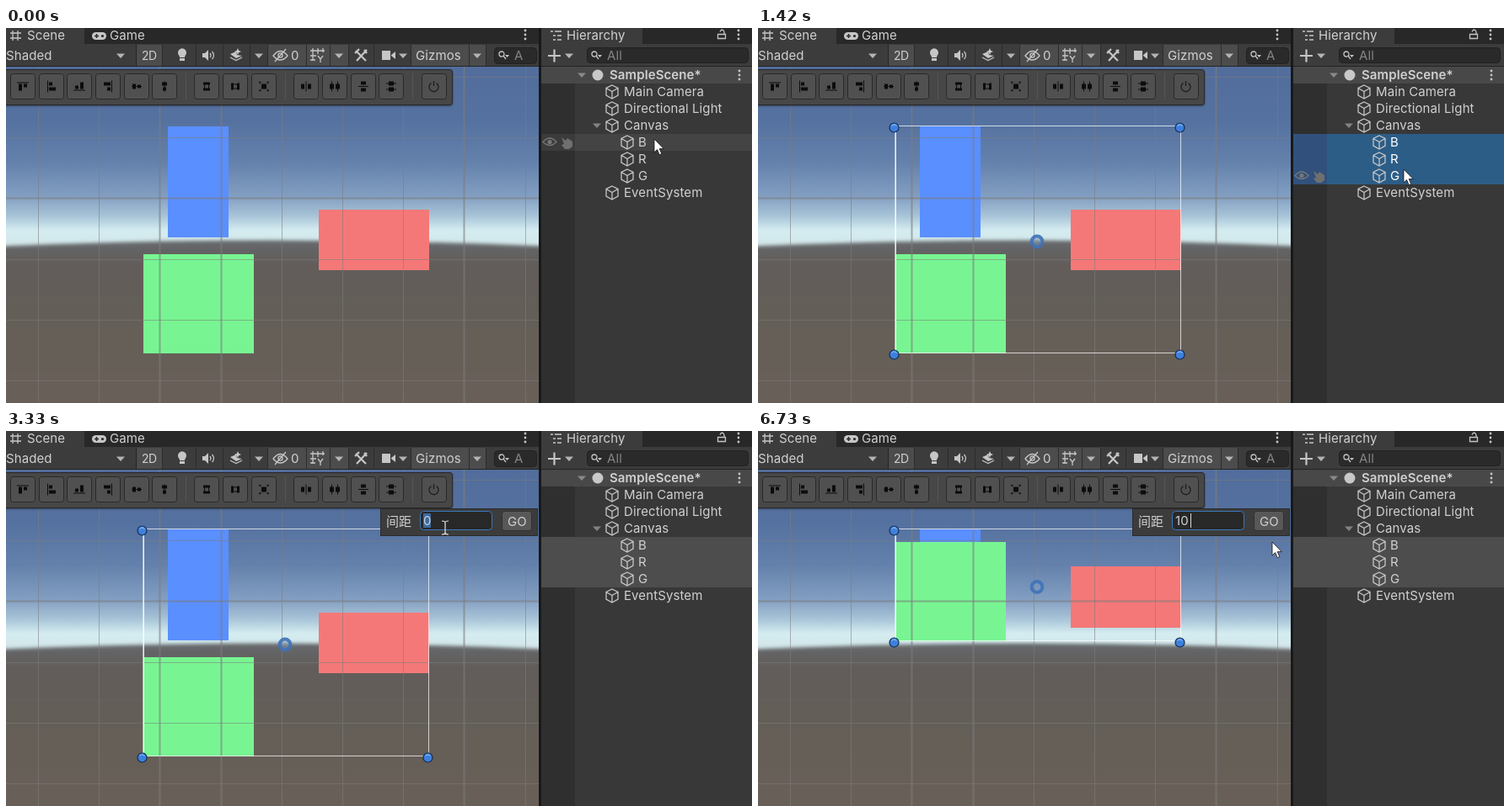
These frames come from a looping animation (885 by 446 pixels, 6790 ms). An HTML page:

```html
<!DOCTYPE html>
<html lang="en">
<head>
<meta charset="utf-8">
<title>Layout tools</title>
<style>
html, body { margin: 0; width: 100%; height: 100%; overflow: hidden; background: #383838; }
svg { display: block; width: 100%; height: 100%; }
text { font: 15px Inter, sans-serif; letter-spacing: .1px; fill: #d0d0d0; white-space: pre; }
.zh { font-family: "Noto Sans CJK SC", "Noto Sans CJK", sans-serif; letter-spacing: 0; }
.dim { fill: #858585; }
.bold { font-weight: 600; }
.mode { font-size: 14px; letter-spacing: -.6px; }
.line { fill: none; stroke: #c6c6c6; stroke-width: 1.3; }
.thick { stroke-width: 2.2; }
.solid { fill: #c6c6c6; }
</style>
</head>
<body>
<svg id="stage" viewBox="0 0 885 446">
  <defs>
    <linearGradient id="sky" gradientUnits="userSpaceOnUse" x1="0" y1="46" x2="0" y2="260">
      <stop offset="0" stop-color="#526d9c"/>
      <stop offset=".3" stop-color="#55719f"/>
      <stop offset=".53" stop-color="#6481ac"/>
      <stop offset=".72" stop-color="#829ec1"/>
      <stop offset=".83" stop-color="#a8c4d8"/>
      <stop offset=".91" stop-color="#d4ecf0"/>
      <stop offset="1" stop-color="#d2e6e9"/>
    </linearGradient>
    <linearGradient id="ground" gradientUnits="userSpaceOnUse" x1="0" y1="253" x2="0" y2="446">
      <stop offset="0" stop-color="#66696c"/>
      <stop offset=".14" stop-color="#625d5a"/>
      <stop offset="1" stop-color="#686059"/>
    </linearGradient>
    <filter id="soft" x="-5%" y="-10%" width="110%" height="120%"><feGaussianBlur stdDeviation="2"/></filter>
    <filter id="shadow" x="-10%" y="-30%" width="120%" height="170%"><feDropShadow dx="0" dy="1" stdDeviation="1.2" flood-opacity=".4"/></filter>
    <clipPath id="sceneClip"><rect y="46" width="632" height="400"/></clipPath>
    <clipPath id="findClip"><rect x="580" y="23" width="33" height="20"/></clipPath>
    <path id="down" d="M-5-2.5h10L0 3z" fill="#b4b4b4"/>
    <path id="cube" class="line" d="M0-8l7 3.5v8.5l-7 4-7-4v-8.5zM-7-4.5l7 4 7-4M0-.5v8.5"/>
    <g id="find"><circle class="line" cx="-2" cy="-2" r="3"/><path class="line" d="M0 0l3 4"/><path class="solid" d="M2-1h5L4.500 2z"/></g>
    <g id="dots" class="solid"><circle cy="-5" r="1.4"/><circle r="1.4"/><circle cy="5" r="1.4"/></g>
  </defs>

  <g clip-path="url(#sceneClip)">
    <rect y="46" width="632" height="224" fill="url(#sky)"/>
    <path d="M-20 260Q316 245 652 260V470H-20z" fill="url(#ground)" filter="url(#soft)"/>
    <rect id="B" x="192" y="117" width="72" height="132" fill="#5a8fff"/>
    <rect id="R" x="371" y="216" width="131" height="72" fill="#f57878"/>
    <rect id="G" x="163" y="269" width="131" height="118" fill="#78f592"/>
    <g id="grid" stroke="#7d7d7d"></g>
    <g id="selection"></g>
  </g>

  <g id="bar"></g>
  <g id="popup">
    <rect x="444.5" y="92.5" width="186" height="32" fill="#3c3c3c" stroke="#2b2b2b"/>
    <text class="zh" lang="zh" x="451" y="112.5">间距</text>
    <rect id="field" x="491.5" y="95.5" width="85" height="22" rx="4" fill="#282828"/>
    <rect id="mark" x="495" y="98" width="9" height="17" fill="#3d6a9e"/>
    <text id="value" x="495" y="112"></text>
    <rect id="caret" y="98" width="1" height="17" fill="#d8d8d8"/>
    <rect id="go" x="588.5" y="95.5" width="35" height="23" rx="3" stroke="#303030"/>
    <text x="595" y="112.5">GO</text>
  </g>

  <g id="sceneTabs">
    <rect width="632" height="19" fill="#282828"/>
    <rect width="93" height="19" fill="#3c3c3c"/>
    <path class="line" d="M8 3v12M14 3v12M5 6h13M5 12h13"/>
    <text x="25" y="14">Scene</text>
    <rect class="solid" x="102" y="5" width="17" height="9" rx="4.5"/>
    <path d="M105 9.5h5M107.5 7v5" stroke="#282828" stroke-width="1.5"/>
    <circle cx="114.5" cy="9.5" r="1.6" fill="#282828"/>
    <text x="123" y="14">Game</text>
    <use href="#dots" x="616" y="8"/>
    <rect y="19" width="632" height="27" fill="#3c3c3c"/>
    <path d="M155 20h30v25h-30zM310 20h96v25h-96zM481 20h88v25h-88z" fill="#4c4c4c"/>
    <path d="M0 45.5h632M154.500 20v25" stroke="#232323"/>
    <path d="M185.5 20v25M225.5 20v25M257.5 20v25M289.5 20v25M310.5 20v25M356.5 20v25M384.5 20v25M406.5 20v25M436.5 20v25M480.5 20v25M549.5 20v25M569.5 20v25" stroke="#2c2c2c"/>
    <text x="0" y="38">Shaded</text>
    <text class="mode" x="161" y="38">2D</text>
    <path class="solid" d="M206 35q0-2-1.5-3.5a5 5 0 1 1 9 0q-1.5 1.5-1.5 3.5zM206 36h6v3h-6z"/>
    <path class="solid" d="M233 30h3l4-4v13l-4-4h-3z"/>
    <path class="line" d="M242 30q2 2.5 0 5M244.5 28q4 4.5 0 9"/>
    <path class="solid" d="M266 31l7-3 1 4 6 1-7 3zM275 24l1.2 2.8 2.8 1.2-2.8 1.2-1.2 2.8-1.2-2.8-2.8-1.2 2.8-1.2z"/>
    <path class="line" d="M266 35l7 3.5 7-3.5"/>
    <path class="line" d="M317 33q8.500-11 17 0-8.500 10-17 0zM319 40l13-15"/>
    <circle class="line" cx="325.5" cy="32.5" r="2.6"/>
    <text x="338" y="38">0</text>
    <path class="line" d="M364 24v15M370 24v7M376 24v5M361 27h17M361 33h7M361 38h6M370 33l3 4 3-4M373 37v4"/>
    <path class="line thick" d="M415 27l12 12M428 26l-12 13M414 30l5-5M425 26l3 4"/>
    <path class="solid" d="M446 27h10v11h-10zM457 32l5-4v9l-5-4z"/>
    <text x="486" y="38">Gizmos</text>
    <rect x="579.5" y="23.5" width="50" height="19" rx="4" fill="#2a2a2a" stroke="#212121"/>
    <use href="#find" x="590" y="33"/>
    <g clip-path="url(#findClip)"><text class="dim" x="603" y="38">A</text></g>
  </g>

  <g id="hierarchy">
    <rect x="632" width="3" height="446" fill="#191919"/>
    <rect x="635" width="250" height="19" fill="#282828"/>
    <rect x="635" width="120" height="19" fill="#3c3c3c"/>
    <path class="line" d="M646 4h3M651 4h8M649 9h3M654 9h5M649 14h3M654 14h5"/>
    <text x="665" y="14">Hierarchy</text>
    <path class="line" d="M844.500 7.500h9v5h-9zM852 7.500v-3q-2.500-5-5 0"/>
    <use href="#dots" x="869" y="8"/>
    <rect x="635" y="19" width="250" height="27" fill="#3c3c3c"/>
    <path d="M635 45.5h250" stroke="#232323"/>
    <path class="line thick" d="M643 33h15M650.5 25.5v15"/>
    <rect x="689.5" y="23.5" width="191" height="18" rx="4" fill="#2a2a2a" stroke="#212121"/>
    <use href="#find" x="700" y="33"/>
    <text class="dim" x="713" y="37.5">All</text>
    <rect x="635" y="46" width="250" height="400" fill="#383838"/>
    <rect x="635" y="46" width="40" height="400" fill="#2f2f2f"/>
    <rect x="635" y="46" width="250" height="20" fill="#484848"/>
    <g id="rows"></g>
    <circle cx="702" cy="56" r="6.5" fill="#c8c8c8"/>
    <text class="bold" x="716" y="61">SampleScene*</text>
    <use href="#dots" x="870" y="56"/>
    <g id="eye">
      <path d="M637-.5q8-9 16 0-8 8-16 0z" fill="none" stroke="#777" stroke-width="1.3"/>
      <circle cx="645" cy="-.5" r="2.6" fill="#777"/>
      <path d="M659-6l5 4 2-3 6 4v6l-4 3h-5l-4-5 3-1z" fill="#707070"/>
    </g>
  </g>

  <path id="arrow" d="M0 0V16L3.6 12.6 6.2 18.7 8.8 17.5 6.2 11.6H11.2z" fill="#fff" stroke="#111" stroke-width=".8"/>
  <path id="beam" d="M-4-8q4 0 4 2 0-2 4-2M-4 8q4 0 4-2 0 2 4 2M0-6V6" fill="none" stroke="#e4e4e4" stroke-width="1.2"/>
</svg>

<script>
const LOOP = 6790;
const $ = id => document.getElementById(id);
const set = (el, attrs) => { for (const k in attrs) el.setAttribute(k, attrs[k]); };
const show = (el, on) => el.setAttribute('visibility', on ? 'visible' : 'hidden');
const append = (id, markup) => $(id).insertAdjacentHTML('beforeend', markup);

// scene grid, with a few stronger lines
const gridLine = (d, major) => `<path d="${d}" stroke-width="${major ? 2 : 1}" opacity="${major ? .6 : .55}"/>`;
const gridAt = (first, i) => Math.round(first + 72.2 * i) + .5;
for (let i = 0; i < 9; i++) append('grid', gridLine(`M${gridAt(38, i)} 46V446`, [2, 3, 7].includes(i)));
for (let i = 0; i < 6; i++) append('grid', gridLine(`M0 ${gridAt(58, i)}H632`, i === 2));

// dropdown and foldout arrows
const down = (x, y, opacity = 1) => `<use href="#down" x="${x}" y="${y}" opacity="${opacity}"/>`;
for (const x of [136, 300, 395, 471, 559]) append('sceneTabs', down(x, 33));
append('hierarchy', down(668, 33) + down(683, 56, .6) + down(701, 116, .6));

// floating align toolbar: [center x, icon path, rotation]
const EDGE = 'M-7-5h14v1h-14zM-5-3h4v8h-4zM1-3h4v4h-4z';
const MIDDLE = 'M-6-.5h12v1h-12zM-5-3h4v6h-4zM1-2h4v4h-4z';
const SIZE = 'M-4-5h8v3h-8zM-4 2h8v3h-8zM-3-2h1v4h-1zM2-2h1v4h-1z';
const BURST = 'M-3-3h6v6h-6zM-6-6l3 1-2 2zM6-6l-3 1 2 2zM-6 6l3-1-2-2zM6 6l-3-1 2-2z';
const GAP = 'M-.5-6h1v12h-1zM-6-3h4v6h-4zM2-3h4v6h-4z';
const SPREAD = 'M-4-6h1v12h-1zM3-6h1v12h-1zM-6-3h5v6h-5zM1-3h5v6h-5z';
const tools = [
  [20, EDGE, 0], [54, EDGE, -90], [87, EDGE, 180], [121, EDGE, 90], [155, MIDDLE, 0], [188, MIDDLE, 90],
  [238, SIZE, 0], [272, SIZE, 90], [306, BURST, 0],
  [356, GAP, 0], [390, SPREAD, 0], [424, GAP, 90], [457, SPREAD, 90], [508, '', 0]
];
append('bar', '<rect x="-5" y="49.5" width="534.5" height="42" rx="3" fill="#464646" stroke="#262626" filter="url(#shadow)"/>'
  + '<path d="M213.5 54v31M331.5 54v31M482.5 54v31" stroke="#555"/>'
  + tools.map(([x, icon, turn]) => `<g transform="translate(${x} 69.5)">
    <rect class="tool" x="-14.5" y="-15" width="29" height="30" rx="3" fill="#505050" stroke="#292929"/>
    <path d="${icon}" transform="rotate(${turn})" fill="#0c0c0c"/></g>`).join('')
  + '<path d="M504.5 65.5a5.500 5.500 0 1 0 6 0M507.5 63v6" fill="none" stroke="#1a1a1a" stroke-width="1.2"/>');
const spreadTool = document.querySelectorAll('.tool')[12];

// hierarchy rows
const names = ['Main Camera', 'Directional Light', 'Canvas', 'B', 'R', 'G', 'EventSystem'];
append('rows', names.map((name, i) => {
  const y = 76 + 20 * i, nested = name.length === 1, x = nested ? 737 : 719;
  return `<rect class="gutter" x="635" y="${y - 10}" width="40" height="20"/>
    <rect class="row" x="675" y="${y - 10}" width="210" height="20"/>
    <use href="#cube" x="${x}" y="${y}"/><text class="name" x="${x + (nested ? 13 : 14)}" y="${y + 5}">${name}</text>`;
}).join(''));
const [gutters, rows, labels] = ['.gutter', '.row', '.name'].map(c => [...document.querySelectorAll(c)]);

const smooth = p => p * p * (3 - 2 * p);
const out = p => 1 - (1 - p) * (1 - p);
// pointer path: time, x, y, easing of the move that ends here
const path = [
  [0, 769, 132], [200, 769, 132], [460, 768, 150, smooth], [660, 768, 150], [900, 767, 168, smooth],
  [1410, 767, 168], [1750, 491, 86, smooth], [1960, 459, 73, out], [2339, 459, 73], [2340, 460, 71],
  [2880, 460, 71], [3060, 521, 115, smooth], [4930, 521, 115], [5120, 572, 122, smooth], [5280, 610, 107, out],
  [6729, 610, 107], [6730, 610, 132], [LOOP, 610, 132]
];
function pointerAt(t) {
  const i = path.findIndex(k => k[0] > t);
  const [t0, x0, y0] = path[i - 1], [t1, x1, y1, ease] = path[i];
  const p = ease ? ease((t - t0) / (t1 - t0)) : 0;
  return [Math.round(x0 + (x1 - x0) * p), Math.round(y0 + (y1 - y0) * p)];
}

function selectionMarkup(ids) {
  if (!ids.length) return '';
  const boxes = ids.map(id => ['x', 'y', 'width', 'height'].map(a => +$(id).getAttribute(a)));
  const left = Math.min(...boxes.map(b => b[0])), top = Math.min(...boxes.map(b => b[1]));
  const right = Math.max(...boxes.map(b => b[0] + b[2])), bottom = Math.max(...boxes.map(b => b[1] + b[3]));
  const knob = (x, y) => `<circle cx="${x - 1.5}" cy="${y + 1.5}" r="5.5" fill="#3d80dc" stroke="#152c50" stroke-width="1.2"/>
    <path d="M${x - 4.5} ${y - .5}q3-3 6 0" fill="none" stroke="#7fb0ee" stroke-width="1.2"/>`;
  const bright = ids.length === 3 ? `<path d="M${left} ${top}V${bottom}" stroke="#fff" stroke-width="1.5" opacity=".7"/>` : '';
  return `<rect x="${left + .5}" y="${top - .5}" width="${right - left - 1}" height="${bottom - top}" fill="none" stroke="#fff" stroke-opacity=".72"/>${bright}`
    + `<circle cx="${(left + right) / 2 - 1.5}" cy="${(top + bottom) / 2 + 2}" r="6.4" fill="#7d9cc4" fill-opacity=".4" stroke="#3f72b8" stroke-opacity=".9" stroke-width="4"/>`
    + knob(left, top) + knob(right, top) + knob(left, bottom) + knob(right, bottom);
}

let lastKey = '';
function draw(t) {
  const [px, py] = pointerAt(t);
  const ids = ['B', 'R', 'G'].slice(0, t < 160 ? 0 : t < 640 ? 1 : t < 1130 ? 2 : 3);
  const moved = t >= 5730, active = t < 2500;

  set($('R'), { y: moved ? 161 : 216, height: moved ? 73 : 72 });
  set($('G'), { y: moved ? 132 : 269 });
  const key = ids.join('') + moved;
  if (key !== lastKey) $('selection').innerHTML = selectionMarkup(ids);
  lastKey = key;

  const hover = px > 675 ? Math.floor((py - 66) / 20) : -1;
  names.forEach((name, i) => {
    const picked = ids.includes(name);
    set(rows[i], { fill: picked ? (active ? '#2c5d87' : '#4d4d4d') : i === hover ? '#444' : '#383838' });
    set(gutters[i], { fill: picked ? (active ? '#31517c' : '#4d4d4d') : i === hover ? '#3b3b3b' : '#2f2f2f' });
    labels[i].style.fill = picked && active ? '#fff' : '#d0d0d0';
  });
  show($('eye'), hover >= 0);
  set($('eye'), { transform: `translate(0 ${76 + hover * 20})` });

  const pressed = t >= 2500 && t < 2930;
  set(spreadTool, { fill: pressed ? '#626262' : '#505050', stroke: pressed ? '#1c1c1c' : '#292929' });

  const open = t >= 2560, focus = t >= 3260;
  const overField = open && px > 491 && px < 577 && py > 94 && py < 119;
  const text = t < 4040 ? '0' : t < 4340 ? '1' : '10';
  show($('popup'), open);
  set($('field'), { stroke: focus ? '#3a79bb' : overField ? '#606060' : '#1c1c1c' });
  show($('mark'), focus && t < 4040);
  $('value').textContent = text;
  show($('caret'), t >= 4040);
  set($('caret'), { x: text === '10' ? 513 : 504 });
  set($('go'), { fill: t >= 5250 && t < 6730 ? '#737373' : '#585858' });

  show($('arrow'), !overField);
  show($('beam'), overField);
  set($(overField ? 'beam' : 'arrow'), { transform: `translate(${px} ${py})` });
}

const start = performance.now();
function tick() {
  draw((performance.now() - start) % LOOP);
  requestAnimationFrame(tick);
}
tick();
</script>
</body>
</html>
```
